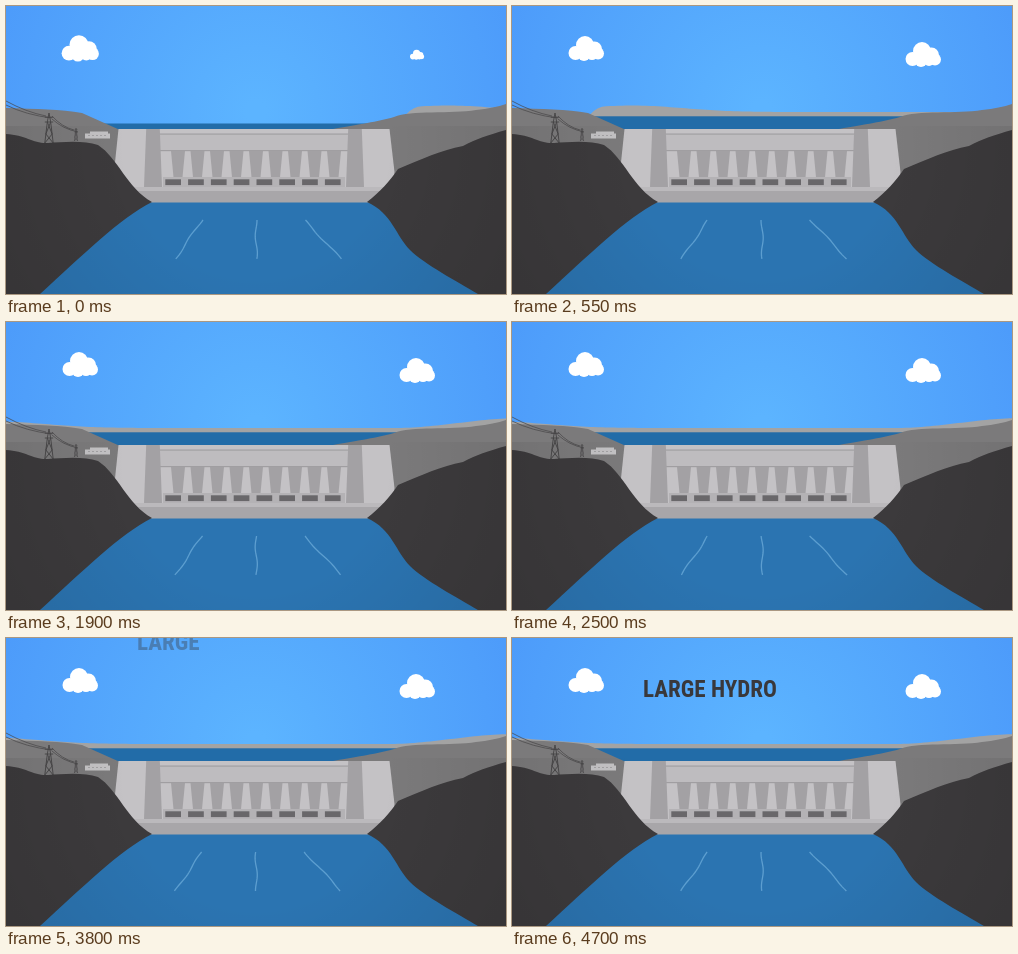
Animation of 500x288 px, one loop 4.75 s. Source, as an HTML page with a canvas:

```html
<!DOCTYPE html>
<html lang="en">
<head>
<meta charset="utf-8">
<title>Large hydro</title>
<style>
html, body { margin: 0; width: 100%; height: 100%; overflow: hidden; background: #5aaafd; }
canvas { display: block; width: 500px; height: 288px; }
</style>
</head>
<body>
<canvas id="stage" width="500" height="288"></canvas>
<script>
const ctx = document.getElementById('stage').getContext('2d');
const LOOP = 4750, STEP = 50, MID = 250;
const clamp = v => Math.max(0, Math.min(1, v));
const easeOut = v => 1 - (1 - clamp(v)) ** 3;
const easeInOut = v => (1 - Math.cos(Math.PI * clamp(v))) / 2;
const bell = (v, center, spread) => Math.exp(-(((v - center) / spread) ** 2) / 2);

function rect(color, x, y, w, h) {
  ctx.fillStyle = color;
  ctx.fillRect(x, y, w, h);
}

function shape(color, path) {
  ctx.fillStyle = color;
  ctx.fill(new Path2D(path));
}

function stroke(color, width, path) {
  ctx.strokeStyle = color;
  ctx.lineWidth = width;
  ctx.stroke(new Path2D(path));
}

// Symmetric trapezoid around a vertical axis.
function taper(color, x, top, bottom, topHalf, bottomHalf) {
  shape(color, `M${x - topHalf} ${top}H${x + topHalf}L${x + bottomHalf} ${bottom}H${x - bottomHalf}Z`);
}

function glow(y, inner, outer, from, to) {
  const g = ctx.createRadialGradient(MID, y, inner, MID, y, outer);
  g.addColorStop(0, from);
  g.addColorStop(1, to);
  return g;
}

const sky = glow(105, 10, 285, '#5cb4ff', '#4c9afa');
const vignette = glow(140, 130, 310, 'rgba(0,0,0,0)', 'rgba(0,0,0,.1)');

function cloud(x, y, scale) {
  ctx.save();
  ctx.translate(x, y);
  ctx.scale(scale, scale);
  ctx.fillStyle = '#fff';
  for (const [cx, cy, r] of [[-10.5, 4, 7], [-1, -4, 9], [8.5, 0, 7.5], [12, 4.5, 6], [-2, 6, 6], [6, 5.5, 5.5]]) {
    ctx.beginPath();
    ctx.arc(cx, cy, r, 0, 7);
    ctx.fill();
  }
  ctx.restore();
}

// Spring-like growth that overshoots once before resting at 1.
const pop = ms => 1 - 0.6 * Math.exp(-ms / 110) * Math.cos(ms / 75);

function farHill(ms) {
  const left = -60 + 460 * Math.exp(-ms / 457);
  ctx.beginPath();
  ctx.moveTo(left, 112);
  for (let u = 0; u <= 600; u += 4) {
    const tip = 7 * (1 - clamp(u / 14)) ** 2;
    ctx.lineTo(left + u, 106 + tip - 6.5 * bell(u, 42, 50) - 10 * easeInOut((u - 440) / 130));
  }
  ctx.lineTo(left + 600, 112);
  ctx.fillStyle = '#a3a3a3';
  ctx.fill();
}

function reservoir(ms) {
  const level = 117.5 - 7.2 * easeOut(ms / 500);
  rect('#226ca8', 60, level, 360, 125 - level);
}

function nearHills() {
  shape('#7b7a7b', 'M0 102C30 103 55 103 76 107L114 124V180H0Z');
  shape('#7b7a7b', 'M327 123C355 118 370 116 388 111C405 104 445 108 470 104Q488 102 500 98V180H380V124Z');
}

function pylon(x, top, bottom, half, width) {
  const h = bottom - top, w = half * 0.4;
  let path = `M${x - half} ${top + h * .14}h${2 * half}M${x - half} ${top + h * .3}h${2 * half}`;
  for (const side of [-1, 1]) {
    path += `M${x} ${top}L${x + side * w} ${top + h * .3}L${x + side * half} ${bottom}`;
    path += `L${x - side * half * .75} ${top + h * .7}L${x + side * w} ${top + h * .3}`;
  }
  stroke('#454345', width, path);
}

function powerLine() {
  stroke('#474547', 0.7, 'M0 95Q20 106 40 110M0 99Q20 109 46 112M46 110Q56 121 68 124M46 113Q57 123 72 126');
  pylon(43, 107, 137, 4.2, 0.9);
  pylon(70, 122, 135, 1.6, 0.5);
  rect('#c3c2c4', 79, 127.5, 25, 5);
  rect('#c3c2c4', 84, 125.5, 18, 3);
  for (let x = 82; x < 102; x += 4) rect('#a2a1a3', x, 129, 2, 1);
}

function dam() {
  shape('#c4c2c5', 'M112.5 123H383.5L388.5 166L384 196H115L108 166Z');
  rect('#bebcbf', 153, 129, 190, 16);
  rect('#c4c2c5', 153, 145, 190, 36);
  for (const y of [127.5, 144]) rect('#a09ea1', 153, y, 190, 1.2);
  for (let i = -4; i <= 4; i++) taper('#a3a1a4', MID + i * 19.5, 145, 171, 7, 4.5);
  rect('#b4b2b5', 157, 171, 182, 10);
  for (let i = 0; i < 8; i++) rect('#69676a', 159.3 + i * 22.8, 173.3, 15.7, 5.8);
  for (const side of [-1, 1]) taper('#a3a1a4', 248 + side * 101, 123, 181, 6.8, 9);
  rect('#bbb9bc', 124, 181, 254, 4);
  rect('#a8a6a9', 128, 185, 246, 11.5);
}

function banks() {
  shape('#3c3a3c', 'M0 128C20 129 28 138 42 137S78 134 92 139C112 152 121 182 146 196C114 212 76 250 34 288H0Z');
  shape('#3c3a3c', 'M500 124C482 129 470 133 457 140C435 144 416 153 392 163C384 175 374 186 361 196'
    + 'C386 207 390 230 404 244S452 276 472 288H500Z');
}

function ripple(x0, x1, ms) {
  ctx.beginPath();
  for (let s = 0; s <= 1; s += 0.05) {
    const sway = Math.cos(2 * Math.PI * (s * 1.25 - ms / 1030));
    ctx.lineTo(x0 + (x1 - x0) * s + sway, 214 + 41 * s);
  }
  ctx.strokeStyle = 'rgba(126,187,228,.6)';
  ctx.lineWidth = 1.3;
  ctx.stroke();
}

const fontAt = size => `bold extra-condensed ${size}px "Roboto Condensed", Roboto, sans-serif`;

function title(ms) {
  ctx.font = fontAt(31);
  const size = Math.min(31, 31 * 134 / ctx.measureText('LARGE HYDRO').width);
  ctx.font = fontAt(size);
  const indent = ctx.measureText('LARGE ').width;
  [['LARGE', 131, 3650], ['HYDRO', 131 + indent, 4000]].forEach(([word, x, start]) => {
    const p = clamp((ms - start) / 400);
    ctx.globalAlpha = p;
    ctx.fillStyle = '#39383b';
    ctx.fillText(word, x, 51 + size * 0.357 - 68 * (1 - easeInOut(p)));
  });
  ctx.globalAlpha = 1;
}

function draw(ms) {
  rect(sky, 0, 0, 500, 200);
  cloud(74, 43, 1 + 0.05 * Math.exp(-ms / 100));
  cloud(411, 49, pop(ms));
  farHill(ms);
  reservoir(ms);
  nearHills();
  powerLine();
  rect('#2b74b1', 0, 196, 500, 92);
  dam();
  banks();
  ripple(196, 168, ms);
  ripple(MID, 250.5, ms);
  ripple(298.5, 337, ms);
  rect(vignette, 0, 120, 500, 168);
  title(ms);
}

const began = performance.now();
function tick() {
  const ms = (performance.now() - began) % LOOP;
  draw(Math.floor(ms / STEP) * STEP);
  requestAnimationFrame(tick);
}
tick();
</script>
</body>
</html>
```
